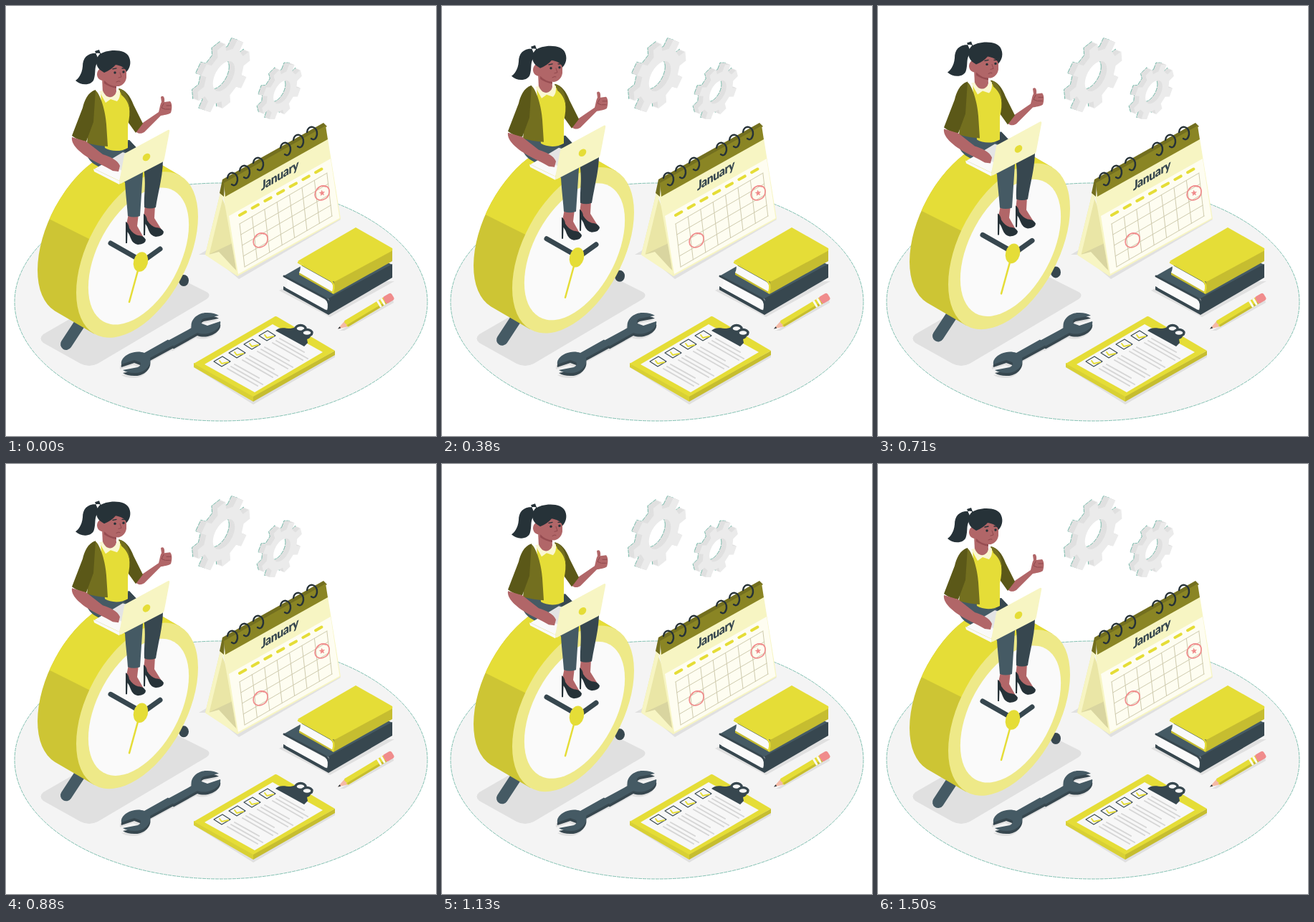
An HTML page for the animation above (1540 ms loop, 600x600 px).

```html
<!DOCTYPE html>
<html lang="en">
<head>
<meta charset="utf-8">
<title>Time management</title>
<style>
html, body { margin: 0; width: 100%; height: 100%; overflow: hidden; background: #fff; }
svg { display: block; width: 100vw; height: 100vh; }
.shadow { fill: #e0e0e0; }
.yellow { fill: #e5dd37; }
.gold { fill: #c6bd30; }
.cream { fill: #f7f5c3; }
.slate { fill: #455a64; }
.navy { fill: #37474f; }
.ink { fill: #263238; }
.skin { fill: #b16668; }
.olive { fill: #736f1f; }
.moss { fill: #5b5818; }
.paper { fill: #fafafa; }
.line { fill: none; stroke-linecap: round; stroke-linejoin: round; }
.rim { stroke: #4fa893; stroke-width: .7; stroke-dasharray: 5 1; }
</style>
</head>
<body>
<svg viewBox="0 0 600 600">
  <defs>
    <clipPath id="topSide"><path d="M40 287L130 332H300V180H40Z"/></clipPath>
    <path id="clockSide" transform="matrix(.85 -.53 0 1.030 128 315)" d="M70.500 -70.900A100 100 0 0 0 -70.500 70.900L-5.800 135.300L135.200 -6.500Z"/>
    <path id="shoe" d="M167 301Q171 303 172 310Q177 318 184 320Q192 320 195 326Q195 332 184 333Q177 332 174 324Q172 318 169.500 315L169 331H167Z"/>
    <path id="wrenchHalf" d="M225 467.500L259 449C256 438 268 427 281 428Q291 428 297 432L276 436Q270 439 273 443L281 446L299 440Q300 444 297 448C291 456 277 460 267 456L234 474.500Z"/>
    <g id="wrench"><use href="#wrenchHalf"/><use href="#wrenchHalf" transform="rotate(180 230 470)"/></g>
  </defs>

  <ellipse class="rim" cx="300" cy="413" rx="288" ry="166" fill="#f4f4f4"/>

  <g class="shadow">
    <path d="M52 458L205 370Q212 366 220 369L280 399Q287 403 280 409L128 499Q116 505 104 499L52 470Q45 464 52 458Z"/>
    <path d="M269 347L300 329L340 345L455 288L467 298L325 381L306 365L290 347Z"/>
    <path d="M381 397L400 387L542 384L452 434Z"/>
    <path d="M262 504L345 556L459 490V484Z"/>
    <path d="M466 453L540 410L541 414L472 453Z"/>
    <use href="#wrench" y="7" x="-2"/>
  </g>

  <g id="gears"></g>

  <g id="calendar">
    <path fill="#eae6a6" d="M299 261L278 347L283 349L323 377L330 340Z"/>
    <path class="cream" d="M299 261L278 347L283 349L303 266Z"/>
    <path fill="#d9d5a0" d="M284 346L316 331L321 368Z"/>
    <path class="cream" d="M279 348L297 343L322 370L323 377Z"/>
    <path class="cream" d="M303 264L449 185L467 297L323 377Z"/>
    <path fill="#fefdf1" d="M311 293L453 213L465.500 296L324 374Z"/>
    <path class="olive" d="M302 242L443 163L448 168L305 248L304 266L298 261Z"/>
    <path fill="#8a8524" d="M304 247L446 167L449 186L306 266Z"/>
    <path id="grid" class="line" stroke="#cfcbae"/>
    <path class="line" stroke="#e5dd37" stroke-width="4" stroke-dasharray="9.500 10.800" d="M326 292L443 226"/>
    <text transform="matrix(.87 -.52 0 1 356 258)" font-family="Lato, sans-serif" font-weight="900" font-size="18" letter-spacing="-.5" fill="#37474f">January</text>
    <g id="rings" class="line" stroke="#263238" stroke-width="2.400"></g>
    <g class="line" stroke="#f08c8c" stroke-width="1.700">
      <path id="mark" d="M360 318C350 314 343 326 346 333C350 340 364 337 365 326C366 316 354 314 349 321"/>
      <use href="#mark" x="86" y="-66"/>
    </g>
    <path id="star" fill="#f08c8c"/>
  </g>

  <g id="books">
    <path class="slate" d="M387 377L471 329L539 361L450 409Z"/>
    <path class="navy" d="M450 408L539 360V379L450 431L387 396V391L446 424Q452 416 450 408Z"/>
    <path class="paper" d="M392 381L445 410Q453 414 449 425L390 393Q394 387 392 381Z"/>
    <path class="line" stroke="#37474f" stroke-width="3" d="M388 377L446 408Q453 413 449 427"/>
    <path class="gold" d="M457 383L539 339V356L457 402L409 375V371L453 396Q459 390 457 383Z"/>
    <path class="paper" d="M410 361L453 385Q459 389 456 399L409 372Q412 366 410 361Z"/>
    <path class="yellow" d="M407 356L488 309L539 338Q540 341 538 342L460 384Q456 385 452 383Z"/>
    <path class="line" stroke="#e5dd37" stroke-width="2.500" d="M408 358L453 383Q460 388 456 400"/>
  </g>

  <g id="pencil" transform="translate(463 450.500) rotate(-31)">
    <path fill="#f4b9a6" d="M0 0L15 -5V5Z"/>
    <path class="ink" d="M0 0L4 -1.300V1.300Z"/>
    <path class="yellow" d="M14 -5H77V5H14Q11 3 14 1Q11 -2 14 -5Z"/>
    <path class="gold" d="M14 2H77V5H14Z"/>
    <path class="paper" d="M66 -5h3v10h-3zM72 -5h3v10h-3z"/>
    <rect x="76" y="-5.500" width="13.500" height="11" rx="3" fill="#f08c8c"/>
  </g>

  <use href="#wrench" class="navy" y="4"/>
  <use href="#wrench" class="slate"/>

  <g id="clipboard">
    <path class="gold" d="M345 544L459 481V487L345 552Z"/>
    <path fill="#d8d035" d="M262 498L345 544V552L262 504Z"/>
    <path class="yellow" d="M262 499L374 434Q376 432 379 434L459 481L345 545Z"/>
    <path fill="#f7f7f7" d="M277 500L372 444L442 483L347 539Z"/>
    <g id="tasks"></g>
    <path class="navy" d="M376 453C382 447 390 450 397 450L406 448L424 458Q427 463 420 465L421 470L416 475Z"/>
    <g class="line" stroke="#37474f" stroke-width="3.400">
      <ellipse cx="411" cy="450" rx="7" ry="4.500" fill="#f7f7f7"/><ellipse cx="420" cy="456" rx="7" ry="4.500" fill="#f7f7f7"/>
    </g>
  </g>

  <g id="floating">
    <path class="line" stroke="#455a64" stroke-width="16" d="M103 443L84 472"/>
    <ellipse class="navy" cx="248" cy="383" rx="7" ry="8"/>
    <use href="#clockSide" fill="#cdc534"/>
    <use href="#clockSide" class="yellow" clip-path="url(#topSide)"/>
    <circle r="100" fill="#eee988" transform="matrix(.85 -.53 0 1.030 183 347)"/>
    <circle r="82.500" class="paper" transform="matrix(.85 -.53 0 1.030 185 349)"/>
    <path class="line" stroke="#37474f" stroke-width="7" d="M146 331L183 352M194 354L215 339"/>
    <ellipse class="yellow" cx="188" cy="357" rx="10" ry="14" transform="rotate(15 188 357)"/>
    <path class="line" stroke="#e5dd37" stroke-width="2.500" d="M186 362L172 413"/>

    <path class="skin" d="M194 278H208L207 296L217 312L198 306L192 296ZM171 290H185L183 307L192 323L173 317L168 305Z"/>
    <use href="#shoe" class="ink"/>
    <use href="#shoe" class="ink" x="25" y="-11"/>
    <path class="navy" d="M192 225L219 214C219 238 212 260 209 281Q201 284 193 281C192 262 196 250 192 225Z"/>
    <path class="slate" d="M111 191C108 200 112 212 122 220L166 246C167 264 169 278 170 293Q178 296 187 293L191 232L219 214L190 207L172 187Z"/>
    <path class="navy" d="M164 201L172 187L192 208L178 212Z"/>

    <path class="skin" d="M181 171L191 163L213 148C215 141 215 137 217 134L216 127C219 124 222 127 221 134L229 133C232 136 232 143 230 149C226 152 220 152 216 153L193 176C186 180 180 177 181 171Z"/>
    <path class="line" stroke="#8f484d" d="M220 136L217 142L222 144M224 139H230M223 144H229"/>
    <path class="moss" d="M157 115C167 117 173 125 178 138L191 164L181 177L171 163Z"/>
    <path class="yellow" d="M132 121C150 130 160 116 164 121C172 132 175 148 170 166V198C160 204 146 203 138 198Z"/>
    <path class="olive" d="M158 115C168 118 173 129 173 146C171 135 167 129 161 124ZM124 117C132 122 139 148 140 165L142 196Q126 195 113 191L116 162Z"/>
    <path class="moss" d="M125 117C114 120 109 133 107 142L92 181Q101 188 112 189L122 162Z"/>
    <path class="skin" d="M134 100L135 121C140 133 151 132 154 119L153 105Z"/>
    <path fill="#faf7d2" d="M130 119L135 118C140 131 152 130 156 116L159 118Q160 128 155 133L146 130L139 135Z"/>

    <path class="ink" d="M131 66C114 64 107 72 107 84C106 96 100 102 97 104C105 112 121 111 123 101C126 91 122 82 131 76ZM124 63L130 61L133 69L128 72Z"/>
    <path class="skin" d="M133 88C137 82 148 80 152 76C162 75 167 82 168 89V100C167 108 160 113 154 112Q146 111 137 104C129 105 125 97 128 91Q130 87 133 88Z"/>
    <path fill="#964c51" d="M137 104Q145 112 154 112V115Q144 113 137 108Z"/>
    <path class="ink" d="M130 68C140 60 168 59 172 72C175 79 173 87 168 92C167 86 160 83 153 82Q147 89 137 93L131 89C125 83 124 75 130 68Z"/>
    <path class="line" stroke="#263238" stroke-width="1.300" d="M149 88L154 87M162 87L166 87"/>
    <path class="line" stroke="#8f484d" d="M159 93L161 99L157 100M154 106Q157 104 159 105"/>
    <circle class="ink" cx="152" cy="93" r="1.700"/><circle class="ink" cx="164" cy="92" r="1.700"/>

    <path fill="#e4e4e4" d="M123 228L163 204L169 206L160 244Z"/>
    <path class="paper" d="M122 227L160 245L158 249L123 231Z"/>
    <path class="paper" d="M124 227L140 218L162 230L158 244Z"/>
    <path class="skin" d="M92 183L112 189L135 207C145 210 156 215 159 223L157 231L149 230L140 225L128 219C108 209 90 195 92 183Z"/>
    <path class="cream" d="M167 205L226 173Q229 172 228 176L221 213Q221 216 218 218L160 248Q157 248 158 245L165 208Q165 206 167 205Z"/>
    <ellipse class="yellow" cx="196" cy="211" rx="6" ry="4.500" transform="rotate(-45 196 211)"/>
  </g>
</svg>
<script>
const byId = id => document.getElementById(id);

function gearPath(radius, hole, teeth, phase) {
  const step = 2 * Math.PI / teeth, root = radius * .76, points = [];
  for (let i = 0; i < teeth; i++)
    for (const [turn, r] of [[-.27, root], [-.2, radius], [.2, radius], [.27, root]]) {
      const a = phase + (i + turn) * step;
      points.push((r * Math.cos(a)).toFixed(1) + ' ' + (r * Math.sin(a)).toFixed(1));
    }
  return `M${points.join('L')}ZM${hole} 0A${hole} ${hole} 0 1 0 ${-hole} 0A${hole} ${hole} 0 1 0 ${hole} 0Z`;
}

function gear(x, y, depth, ...shape) {
  const d = gearPath(...shape);
  let layers = '';
  for (let k = depth; k >= 0; k--)
    layers += `<path d="${d}" fill-rule="evenodd" fill="${k ? '#e0e0e0' : '#ebebeb'}" ` +
      `${k === depth ? 'class="rim"' : ''} transform="matrix(.85 -.57 0 1.02 ${x - k} ${y - k * .4})"/>`;
  return layers;
}

byId('gears').innerHTML = gear(304, 98, 8, 43, 18, 8, -.88) + gear(385, 120, 7, 33, 14, 8, -1.05);

// Calendar grid: 7 columns by 4 rows on a slanted page.
let grid = '';
for (let c = 0; c <= 7; c++) grid += `M${326 + c * 17.4} ${304 - c * 10.1}l7 60`;
for (let r = 0; r <= 4; r++) grid += `M${326 + r * 1.75} ${304 + r * 15}l122 -71`;
byId('grid').setAttribute('d', grid);

byId('rings').innerHTML = [[316, 239], [333, 229], [352, 218], [390, 197], [408, 186], [427, 175]]
  .map(([x, y]) => `<path transform="translate(${x} ${y})" d="M-7 1C-6 -10 8 -8 7 4C6 10 3 13 -1 10"/>`).join('');

const star = Array.from({ length: 10 }, (_, i) => {
  const r = i % 2 ? 2 : 4.5, a = i * Math.PI / 5 - 1.7;
  return `${441 + r * Math.cos(a)} ${261 + r * Math.sin(a)}`;
});
byId('star').setAttribute('d', `M${star.join('L')}Z`);

byId('tasks').innerHTML = [0, 1, 2, 3].map(i => `
  <g class="line" transform="translate(${301 + i * 21} ${496 - i * 12})">
    <path stroke="#37474f" stroke-width="1.1" d="M-11 0L1 -7L12 0L0 7Z"/>
    <path stroke="#e5dd37" stroke-width="2" d="M-3 -1L0 3L9 1"/>
    <path stroke="#d6d6d6" stroke-width="2" d="M8 10l42 24M13 7l44 25M18 4l34 19"/>
  </g>`).join('');

const LOOP = 1540, PEAK = 735, END = 1490, LIFT = 12;
const floating = byId('floating');

function draw(now) {
  const t = now % LOOP;
  const rise = t < PEAK ? t / PEAK : Math.max(0, (END - t) / (END - PEAK));
  floating.setAttribute('transform', `translate(0 ${-LIFT * rise})`);
  requestAnimationFrame(draw);
}
draw(performance.now());
</script>
</body>
</html>
```
